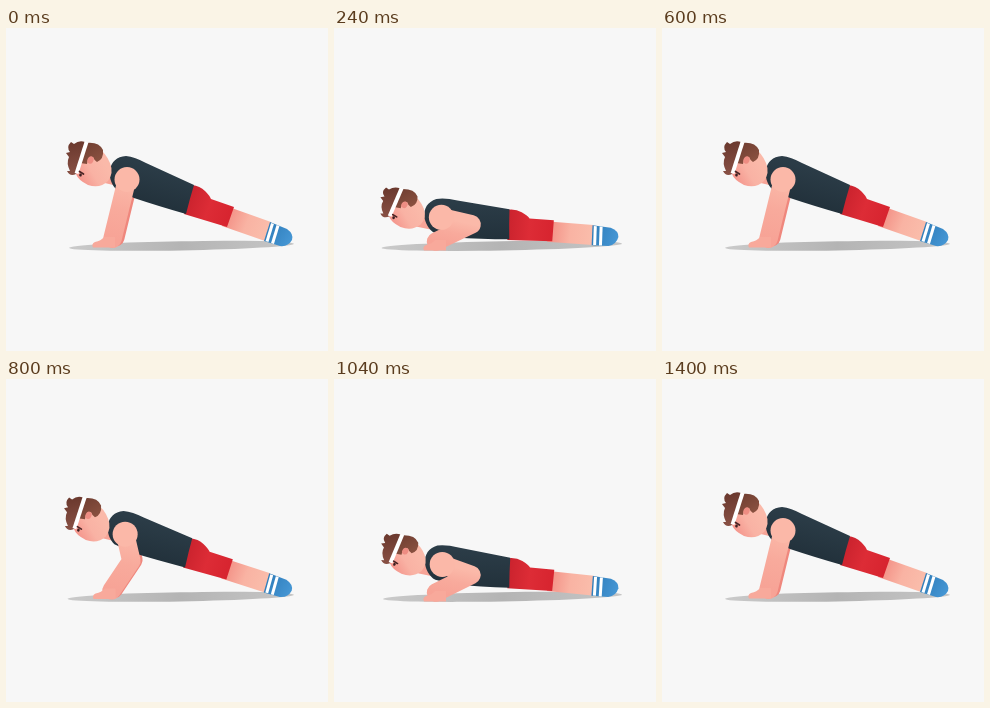
Recreate the animation shown at these times as an HTML page with a canvas. Size 322 px wide and 323 px high, loop 1520 ms.

```html
<!DOCTYPE html>
<html lang="en">
<head>
<meta charset="utf-8">
<title>Push-ups</title>
<style>
  html, body { margin: 0; width: 100%; height: 100%; overflow: hidden; background: #f7f7f7; }
  canvas { display: block; }
</style>
</head>
<body>
<canvas id="stage" width="322" height="323"></canvas>
<script>
const ctx = document.getElementById('stage').getContext('2d');
const STEP = 40, PERIOD = 760;
// Depth of the push-up at each step: 0 is up, 1 is down.
const DEPTH = [0, .1, .38, .71, .93, 1.02, 1, .9, .74, .54, .52, .33, .17, .06, .01];
const FOOT = { x: 275, y: 209 };

const shapes = {
  leg: 'M220 178 L265 194 L259 213 L216 198 Z',
  sock: 'M264 194 L281 201 Q288 206 286 212 Q282 219 274 218 L258 213 Z',
  shorts: 'M186 157 Q194 158 199 163 Q204 168 205 171 L228 179 L221 199 L178 186 Z',
  vest: 'M110 161 C100 151 101 129 120 128 Q129 129 140 135 L188 157 Q184 170 180 186 Q152 178 128 170 Z',
  face: 'M73 126 L70 146 Q72 152 82 157 Q94 161 102 153 Q108 145 104 135 Q100 125 92 120 Z',
  backHair: 'M79 115 Q93 113 97 122 Q98 131 91 134 Q88 132 87 129 Q82 127 81 136 L74 135 Z',
  frontHair: 'M79 114 L70 146 Q64 149 61 143 L64 143 Q60 135 63 129 L60 125 L64 124 Q60 119 65 114 L68 116 Q73 112 79 114 Z',
  hand: 'M98 209 Q95 213 89 214 Q85 216 87 219.5 L109 219.5 L109 209 Z'
};
for (const name in shapes) shapes[name] = new Path2D(shapes[name]);

function fade(x0, y0, x1, y1, ...colors) {
  const g = ctx.createLinearGradient(x0, y0, x1, y1);
  colors.forEach((c, i) => g.addColorStop(i / (colors.length - 1), c));
  return g;
}

function fill(shape, color) {
  ctx.fillStyle = color;
  ctx.fill(shapes[shape]);
}

function line(color, width, ...points) {
  ctx.strokeStyle = color;
  ctx.lineWidth = width;
  ctx.beginPath();
  points.forEach(p => ctx.lineTo(p[0], p[1]));
  ctx.stroke();
}

function oval(color, x, y, rx, ry, turn = 0) {
  ctx.fillStyle = color;
  ctx.beginPath();
  ctx.ellipse(x, y, rx, ry, turn, 0, 2 * Math.PI);
  ctx.fill();
}

function place(x, y, angle, draw, squash = 1) {
  ctx.save();
  ctx.translate(x, y);
  ctx.scale(1, squash);
  ctx.rotate(angle);
  draw();
  ctx.restore();
}

// Where a point of the raised body lands after turning about the foot.
function turned(x, y, a) {
  const dx = x - FOOT.x, dy = y - FOOT.y, c = Math.cos(a), s = Math.sin(a);
  return [FOOT.x + dx * c - dy * s, FOOT.y + dx * s + dy * c];
}

function elbow([sx, sy], [wx, wy], upper, fore) {
  const dx = wx - sx, dy = wy - sy, d = Math.hypot(dx, dy);
  const along = (upper ** 2 - fore ** 2 + d * d) / (2 * d);
  const out = Math.sqrt(Math.max(0, upper ** 2 - along ** 2));
  return [sx + (dx * along + dy * out) / d, sy + (dy * along - dx * out) / d];
}

function drawBody() {
  ctx.translate(-FOOT.x, -FOOT.y);
  fill('leg', fade(220, 186, 262, 203, '#f28d83', '#f9b3a3', '#fabdab'));
  fill('sock', fade(262, 200, 284, 214, '#2f7dba', '#4596d4'));
  ctx.lineCap = 'butt';
  line('#fff', 3, [266.5, 195.5], [261, 213.5]);
  line('#fff', 3, [272, 197.5], [266.5, 215.5]);
  fill('shorts', fade(180, 172, 225, 188, '#c9222d', '#dd2c36', '#d7242f'));
  fill('vest', fade(150, 140, 140, 176, '#2b3c47', '#22313b'));
}

function drawHead() {
  ctx.translate(-85, -138);
  fill('face', fade(74, 154, 100, 138, '#f4948b', '#f9b2a4', '#fab9a9'));
  fill('backHair', fade(80, 115, 92, 134, '#713f32', '#8a5140'));
  oval('#ee8d83', 84.5, 132, 3, 3.8, .4);
  fill('frontHair', fade(64, 115, 68, 146, '#6b392e', '#885044'));
  ctx.lineCap = 'butt';
  line('#fff', 4, [80.5, 114], [70.5, 145.5]);
  ctx.lineCap = 'round';
  line('#4a2525', 1.7, [73.5, 143.5], [77.5, 146]);
  oval('#3b2022', 74.5, 147, 1.3, 1.6, .3);
}

function drawArm(shoulder, joint, wrist, k) {
  const skin = fade(...shoulder, ...wrist, '#fbb9a9', '#f8aa9c', '#f7a396');
  ctx.lineCap = ctx.lineJoin = 'round';
  line(skin, 18.5, shoulder, joint, wrist);
  oval('#fbb8a8', ...shoulder, 12.5, 12.5);
  place(3 * k, 3 * k, 0, () => fill('hand', '#f8a99b'));
}

function draw(q) {
  const angle = -15 * q * Math.PI / 180, k = Math.min(1, 2 * q);
  const shoulder = turned(121, 151.5, angle).map(v => v - 4 * q);
  const wrist = [106.5 - 4.5 * k, 210.8 + 2.7 * k];
  const joint = elbow(shoulder, wrist, 26.5 + 4.5 * k, 34.5 + 5 * k);
  const head = turned(85, 138, angle);
  head[0] -= 2.5 * q;
  head[1] -= 7.4 * q;
  const left = 63 - 15.5 * q;

  ctx.fillStyle = '#f7f7f7';
  ctx.fillRect(0, 0, 322, 323);
  oval(fade(left, 0, 288, 0, '#cacaca', '#b4b4b4', '#c6c6c6'), (left + 288) / 2, 217.8, (288 - left) / 2, 4.6, -.018);

  ctx.lineCap = ctx.lineJoin = 'round';
  const far = 3.5 * (1 - k);
  line('#ef877d', 17, ...[shoulder, joint, wrist].map(([x, y]) => [x + far, y - far / 3]));
  line('#f7a497', 15, [head[0] + 8, head[1] + 8], turned(110, 150, angle));

  place(FOOT.x - 2 * k, FOOT.y, angle, drawBody);
  drawArm(shoulder, joint, wrist, k);
  place(...head, .06 * q, drawHead, 1 - .1 * q);
}

function frame() {
  const step = Math.floor(performance.now() % PERIOD / STEP);
  draw(DEPTH[step] || 0);
  requestAnimationFrame(frame);
}
frame();
</script>
</body>
</html>
```
